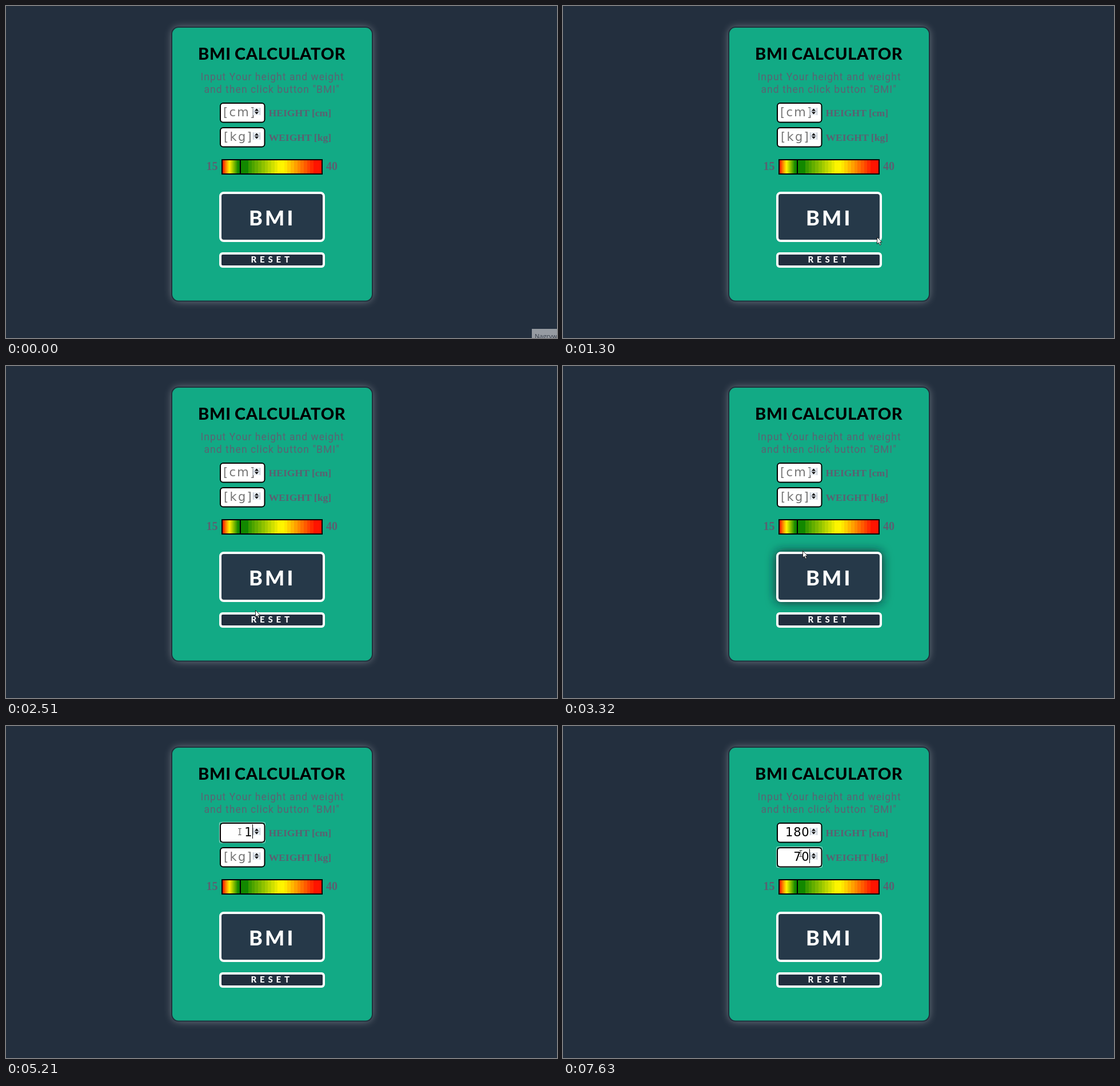
An HTML page that plays this animation: 964x581 px, repeating every 8 s.

```html
<!DOCTYPE html>
<html lang="en">
<head>
<meta charset="utf-8">
<title>BMI calculator</title>
<style>
  html, body { margin: 0; width: 100%; height: 100%; overflow: hidden; background: #232f3e; }
  svg { display: block; width: 964px; height: 581px; }
  .head { font-family: Lato, sans-serif; font-weight: 800; }
  .hint { font: 17.5px Roboto, sans-serif; letter-spacing: 1.05px; fill: #5b6372; }
  .label { font: bold 17.6px "Liberation Serif", serif; fill: #5c5f70; }
  .field { font: 21px "DejaVu Sans", sans-serif; }
  .ghost { letter-spacing: 2.3px; fill: #757575; }
  .value { letter-spacing: .8px; text-anchor: end; fill: #000; }
</style>
</head>
<body>
<svg viewBox="0 0 964 581">
  <defs>
    <filter id="glow" x="-20%" y="-20%" width="140%" height="140%"><feGaussianBlur stdDeviation="7"/></filter>
    <filter id="shade" filterUnits="userSpaceOnUse" x="330" y="280" width="270" height="230"><feGaussianBlur stdDeviation="9"/></filter>
    <linearGradient id="low">
      <stop offset="0" stop-color="#ff1400"/>
      <stop offset=".2" stop-color="#ff8a00"/>
      <stop offset=".4" stop-color="#fff500"/>
      <stop offset=".9" stop-color="#128800"/>
    </linearGradient>
    <g id="spin">
      <path d="M432.5 178v13M444.5 178v13M432 184.5h13" stroke="#b4bcc8"/>
      <path d="M433 178h11v6h-11zM433 185h11v6h-11z" fill="#e8edf2"/>
      <path d="M438.5 179.5l3.5 4h-7zM438.5 189.5l3.5-4h-7z"/>
    </g>
  </defs>

  <rect width="964" height="581" fill="#232f3e"/>
  <rect x="290" y="37" width="351" height="480" rx="13" fill="#fff" opacity=".36" filter="url(#glow)"/>
  <rect x="290" y="37" width="351" height="479.5" rx="12" fill="#12aa85" stroke="#20303c" stroke-width="2"/>

  <g class="head" font-size="29" letter-spacing=".7">
    <text x="336" y="94">BMI</text>
    <text x="400" y="94">CALCULATOR</text>
  </g>
  <g class="hint">
    <text x="340.5" y="130">Input Your height and weight</text>
    <text x="346.5" y="152">and then click button "BMI"</text>
  </g>

  <g id="fields"></g>
  <g class="label">
    <text x="459.5" y="193">HEIGHT [cm]</text>
    <text x="459.5" y="236">WEIGHT [kg]</text>
    <text x="350.5" y="287" font-size="20" style="font-size:20px">15</text>
    <text x="560" y="287" style="font-size:20px">40</text>
  </g>

  <rect x="377" y="268" width="177" height="27"/>
  <rect x="379" y="270" width="30" height="23" fill="url(#low)"/>
  <g id="scale" shape-rendering="crispEdges"></g>

  <rect id="bigShade" x="373" y="325" width="185" height="88" rx="8" fill="#16232f" filter="url(#shade)"/>
  <rect id="smallShade" x="373" y="431" width="185" height="27" rx="6" fill="#16232f" filter="url(#shade)"/>
  <g stroke="#fff" stroke-width="4">
    <rect x="375" y="327" width="181" height="84" rx="6" fill="#263949"/>
    <rect x="375" y="433" width="181" height="23" rx="4" fill="#222e3e"/>
  </g>
  <g class="head" fill="#fff">
    <text x="425" y="384" font-size="36" letter-spacing="4.2">BMI</text>
    <text x="428.5" y="448.5" font-size="15" letter-spacing="5.8">RESET</text>
  </g>

  <g id="tip">
    <rect x="920" y="565" width="44" height="16" fill="#969ba2"/>
    <text x="925" y="582" font-size="11" font-family="'Open Sans', sans-serif" fill="#343c48">Nagrywa</text>
  </g>
  <path id="arrow" d="M.5.5v12l2.8-2.6 2 4.4 2-.9-2-4.2h3.7z" fill="#fff" stroke="#111" stroke-width=".9"/>
  <path id="beam" d="M-2.5-5.5h2l.5.5.5-.5h2M0-5v10M-2.5 5.5h2l.5-.5.5.5h2" fill="none" stroke="#333"/>
</svg>
<script>
const LOOP = 8000;
const $ = id => document.getElementById(id);
const show = (el, on) => el.setAttribute('visibility', on ? 'visible' : 'hidden');
const within = (t, spans) => spans.some(([a, b]) => t >= a && t < b);

// Two number fields, 43 px apart
const fields = [
  { hint: '[cm]', x: 380, y: 0, focus: [4490, 6610], blink: [5010, 5210],
    typed: [[5210, '1'], [5540, '18'], [5870, '180']] },
  { hint: '[kg]', x: 381, y: 43, focus: [6610, LOOP], blink: [7030, 7280],
    typed: [[7280, '7'], [7630, '70']] }
];
$('fields').innerHTML = fields.map(f => `
  <g transform="translate(0 ${f.y})" class="field">
    <rect class="ring" x="373.5" y="168.5" width="80" height="36" rx="2" fill="none" stroke="#a9d8cb"/>
    <rect x="375" y="170" width="77.5" height="33.5" rx="5" fill="#fff" stroke="#000" stroke-width="2"/>
    <text class="ghost" x="${f.x}" y="193">${f.hint}</text>
    <text class="value" x="431.5" y="193"></text>
    <use href="#spin"/>
    <rect class="caret" x="431" y="172" width="1" height="25"/>
  </g>`).join('');
fields.forEach((f, i) => {
  const g = $('fields').children[i];
  for (const c of ['ring', 'ghost', 'value', 'caret']) f[c] = g.querySelector('.' + c);
});

// Stepped part of the scale: green, yellow, red
const mix = (a, b, k) => a.map((v, i) => Math.round(v + (b[i] - v) * Math.max(0, Math.min(1, k))));
const GREEN = [18, 136, 0], YELLOW = [255, 245, 0], RED = [255, 20, 0];
let bars = '<rect x="411" y="270" width="13" height="23" fill="rgb(18,136,0)"/>';
for (let x = 424; x < 552; x += 5.7) {
  const c = x < 484 ? mix(GREEN, YELLOW, (x - 414) / 62) : mix(YELLOW, RED, (x - 483) / 55);
  bars += `<rect x="${x.toFixed(1)}" y="270" width="${Math.min(6, 552 - x).toFixed(1)}" height="23" fill="rgb(${c})"/>`;
}
$('scale').innerHTML = bars;

// Pointer: time, x, y
const path = [
  [260, 841, 564], [1030, 626, 448], [1300, 549, 405], [1560, 490, 315], [1840, 458, 226],
  [1910, 457, 208], [2045, 446, 290], [2112, 435, 357], [2180, 436, 412],
  [2510, 436, 427], [2585, 437, 438], [2660, 437, 441],
  [2930, 436, 428], [3000, 434, 408], [3266, 422, 340], [3334, 419, 323], [3670, 413, 283],
  [4160, 409, 185], [5870, 409, 185], [6540, 416, 223]
];
// Bursts of movement: start, end, number of positions
const bursts = [
  [260, 1030, 12], [1100, 1840, 12], [1910, 2180, 5], [2510, 2660, 3],
  [2930, 3670, 12], [3750, 4160, 7], [5870, 6610, 11]
];

function snap(t) {
  const run = bursts.filter(b => t >= b[0]).pop();
  if (!run) return t;
  const [a, b, n] = run;
  const k = Math.min(n - 1, Math.floor((t - a) / (b - a) * (n - 1) + .25));
  return a + (b - a) * k / (n - 1);
}

function pointer(t) {
  const i = path.findIndex(p => p[0] > t);
  if (i < 0) return path[path.length - 1].slice(1);
  if (i === 0) return path[0].slice(1);
  const [a, x, y] = path[i - 1], [b, u, v] = path[i];
  const k = (t - a) / (b - a);
  return [x + (u - x) * k, y + (v - y) * k];
}

function draw(t) {
  show($('tip'), t < 70);
  show($('bigShade'), within(t, [[1368, 1640], [2180, 2510], [3010, 3390]]));
  show($('smallShade'), within(t, [[2580, 2930]]));

  for (const f of fields) {
    const last = f.typed.filter(k => t >= k[0]).pop();
    const focused = within(t, [f.focus]);
    f.value.textContent = last ? last[1] : '';
    show(f.ghost, !last);
    show(f.ring, focused);
    show(f.caret, focused && !within(t, [f.blink]));
  }

  const [x, y] = pointer(snap(t)).map(Math.round);
  const typing = x > 374 && x < 453 && within(y, [[169, 204], [212, 247]]);
  const place = `translate(${x} ${y})`;
  $('arrow').setAttribute('transform', place);
  $('beam').setAttribute('transform', place);
  show($('arrow'), t >= 260 && !typing);
  show($('beam'), t >= 260 && typing);
}

const start = performance.now();
function frame() {
  draw((performance.now() - start) % LOOP);
  requestAnimationFrame(frame);
}
draw(0);
requestAnimationFrame(frame);
</script>
</body>
</html>
```
